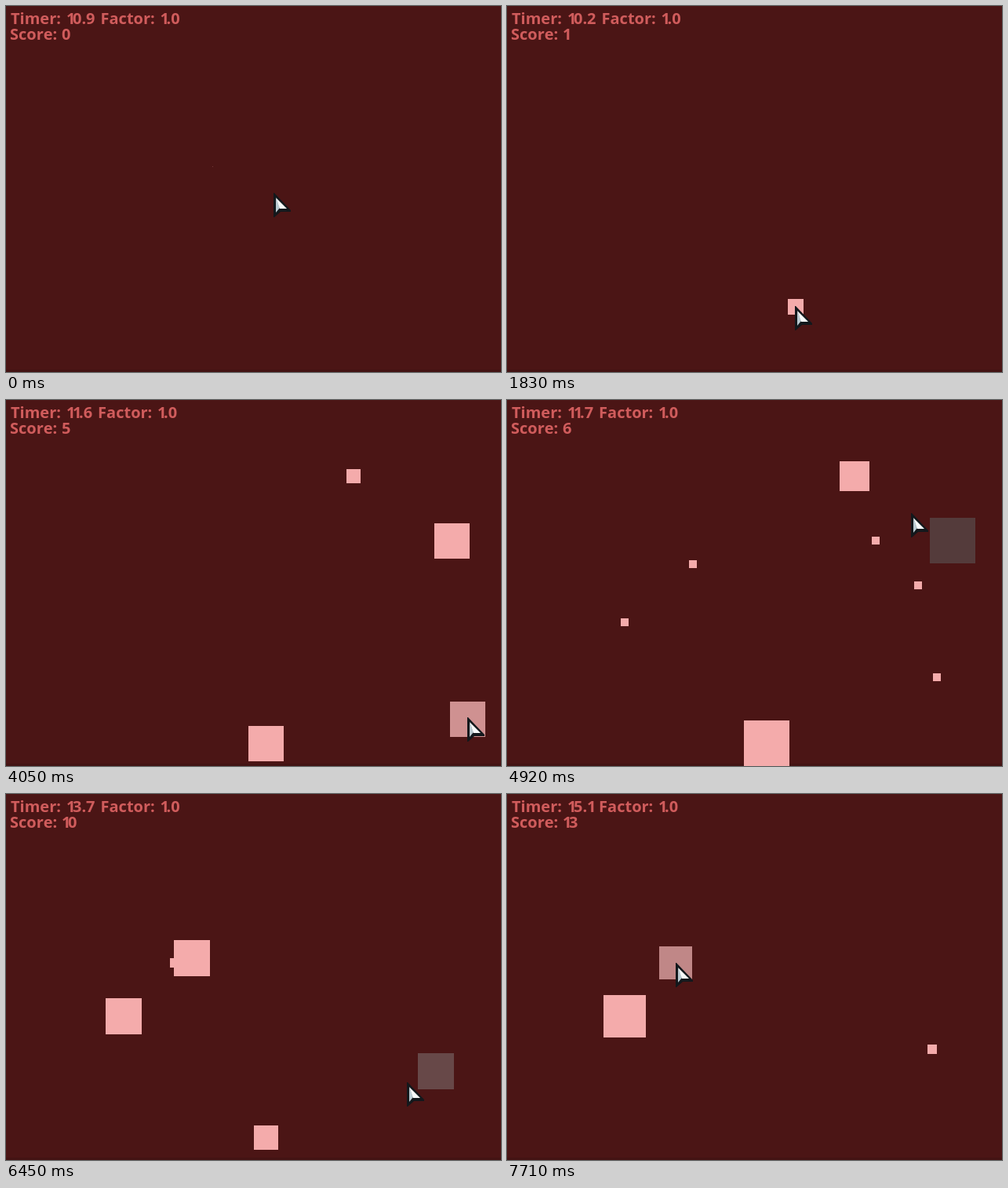
An HTML page with a canvas for the animation above (7.74 s loop, 631 by 466 pixels).

```html
<!DOCTYPE html>
<html lang="en">
<head>
<meta charset="utf-8">
<title>Square clicker</title>
<style>
html, body { margin: 0; width: 100%; height: 100%; overflow: hidden; background: #4b1515; }
canvas { display: block; }
</style>
</head>
<body>
<canvas id="stage" width="631" height="466"></canvas>
<script>
const ctx = document.getElementById('stage').getContext('2d');
const LOOP = 7740, STEP = 30, FADE = 260;
const GROW = .024, SHRINK = .0214, MAX_SIZE = 58, LIFE = 5720;
const START_TIME = 10.9, DRAIN = .82, BONUS = .813;
const PINK = [244, 171, 171];

const square = (born, x, y, click = Infinity) => ({ born, x, y, click });
const wave = (born, ...spots) => spots.map(spot => square(born, ...spot));

const squares = [
  square(-10, 263, 204, 820),
  square(1000, 368, 383, 1880),
  ...wave(2190, [405.5, 389, 3250], [533, 333, 3620], [588, 406, 4011],
    [568, 179, 4750], [331, 437, 6870]),
  square(3320, 442.5, 96.5, 5130),
  ...wave(4515, [470, 179, 5576], [524, 236, 5850], [548, 353, 6300],
    [237, 209, 7250], [150, 283]),
  square(5950, 215, 215, 7655),
  square(7210, 542, 325)
];

// The pointer glides from each clicked square to the next
const stops = [
  { x: 341, y: 238, click: 0 },
  ...squares.filter(s => s.click < LOOP).sort((a, b) => a.click - b.click)
];

function pointerAt(t) {
  const from = stops.findLast(s => s.click <= t);
  const to = stops.find(s => s.click > t) || from;
  const u = (t - from.click) / (to.click - from.click || 1);
  const k = to === from ? 0 : u * u * (3 - 2 * u);
  return ['x', 'y'].map(a => Math.round(from[a] + (to[a] - from[a]) * k));
}

// Grow, hold, then shrink away
const sizeAt = age => Math.max(0, Math.min(MAX_SIZE, age * GROW, (LIFE - age) * SHRINK));

function drawSquare({ born, x, y, click }, t) {
  if (t < born || t > click + FADE) return;
  const size = sizeAt(t - born);
  const side = Math.max(1, Math.round(size));
  const light = 1 - Math.max(0, t - click) / FADE;
  ctx.fillStyle = `rgb(${PINK.map(c => Math.round(c * light))})`;
  ctx.globalAlpha = Math.min(1, size);
  ctx.fillRect(Math.round(x - side / 2), Math.round(y - side / 2), side, side);
  ctx.globalAlpha = 1;
}

function polygon(color, points) {
  ctx.fillStyle = color;
  ctx.beginPath();
  points.forEach(([x, y]) => ctx.lineTo(x, y));
  ctx.fill();
}

function drawPointer(x, y) {
  ctx.save();
  ctx.translate(x, y);
  polygon('#13181c', [[0, 0], [1, 0], [22, 22], [22, 24], [9, 24], [1, 31], [0, 31]]);
  polygon('#b9c9d0', [[3, 6], [8, 19], [3, 25]]);
  polygon('#f7fafa', [[3, 6], [17, 20], [8, 20]]);
  ctx.restore();
}

// The digit 1 is set narrower than the others; returns the end of the text
function label(text, x, y) {
  for (const ch of text) {
    ctx.fillText(ch, x, y);
    x += ch === '1' ? 8 : ctx.measureText(ch).width;
  }
  return x;
}

function draw(t) {
  ctx.fillStyle = '#4b1515';
  ctx.fillRect(0, 0, 631, 466);
  ctx.fillStyle = '#431313';
  ctx.fillRect(0, 463, 631, 3);
  squares.forEach(s => drawSquare(s, t));

  const score = squares.filter(s => s.click <= t).length;
  const timer = START_TIME - DRAIN * t / 1000 + BONUS * score;
  ctx.font = 'bold 20px "Open Sans", "Noto Sans", sans-serif';
  ctx.fillStyle = '#d05c5c';
  label('Timer:', 6, 23);
  const x = label(timer.toFixed(1), 77, 23) + 7;
  label('Factor:', x, 23);
  label('1.0', x + 76, 23);
  label('Score:', 5, 43);
  label(String(score), 71, 43);

  drawPointer(...pointerAt(t));
}

const start = performance.now();
function tick() {
  const t = (performance.now() - start) % LOOP;
  draw(Math.floor(t / STEP) * STEP);
  requestAnimationFrame(tick);
}
tick();
</script>
</body>
</html>
```
